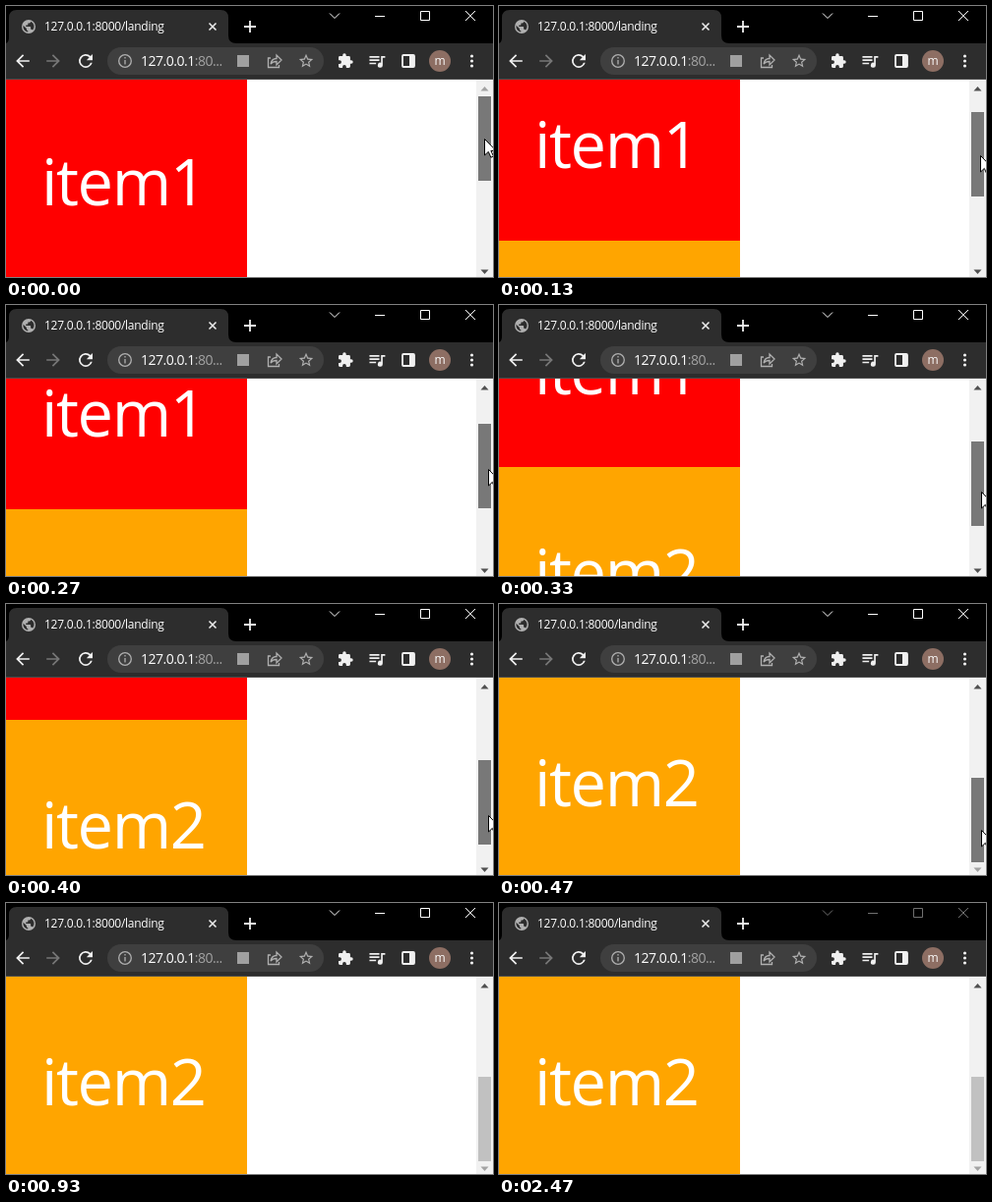
Recreate the animation shown at these times as an HTML page. Size 495 by 276 pixels, loop 4010 ms.

```html
<!DOCTYPE html>
<html lang="en">
<head>
<meta charset="utf-8">
<title>Scrolling page</title>
<style>
  html, body { margin: 0; width: 100%; height: 100%; overflow: hidden; background: #000; }
  svg { display: block; width: 495px; height: 276px; }
  text { font-family: "Open Sans", "Noto Sans", sans-serif; fill: #fff; }
  .line { fill: none; stroke: #f0f0f0; stroke-width: 1.8; }
  .soft { fill: none; stroke: #b0b0b0; stroke-width: 1.3; }
  .item { font-size: 65px; letter-spacing: -1.4px; }
</style>
</head>
<body>
<svg viewBox="0 0 495 276">
  <rect width="495" height="276" fill="#fff"/>

  <g id="page">
    <rect y="75" width="245" height="202" fill="#f00"/>
    <rect y="277" width="245" height="202" fill="#ffa500"/>
    <text class="item" x="36" y="203">item1</text>
    <text class="item" x="36" y="408">item2</text>
  </g>

  <g id="scrollbar">
    <rect x="478" y="75" width="17" height="201" fill="#f1f1f1"/>
    <path id="up" d="M482.500 86.500h8l-4-4.500z"/>
    <path id="down" d="M482.500 268.500h8l-4 4.500z"/>
    <rect id="thumb" x="480" width="13" height="86"/>
  </g>

  <g id="tabs">
    <rect width="495" height="38" fill="#000"/>
    <path d="M0 38q3-1 3-6V12q0-8 8-8H218q8 0 8 8v18q0 8 8 8z" fill="#2d2d2d"/>
    <text x="39" y="25" font-size="12" letter-spacing="-.25">127.0.0.1:8000/landing</text>
    <path class="line" style="stroke-width:1.5" d="M206.500 17.500l7 7m0-7l-7 7"/>
    <path class="line" d="M242 21h12m-6-6v12"/>
    <path id="controls" fill="none" stroke-linejoin="round"
      d="M329 7.500l5 5 5-5M375 10.500h10M421.500 5.500h9v9h-9zM467 5l10 10m0-10l-10 10"/>
  </g>

  <g id="toolbar">
    <rect y="38" width="495" height="37" fill="#2d2d2d"/>
    <rect y="74" width="495" height="1" fill="#4b4b4b"/>
    <rect x="103" y="42" width="220" height="28" rx="14" fill="#3f3f3f"/>
    <circle class="soft" cx="121" cy="56" r="6.300"/>
    <path class="soft" d="M121 55v4.500M121 52v1.600"/>
    <text x="137" y="61" font-size="14" letter-spacing="-.5">127.0.0.1<tspan fill="#a4a4a4">:80...</tspan></text>
    <rect x="235" y="50" width="12" height="12" fill="#a0a0a0"/>
    <path class="soft" d="M269 53h-2.500v9.500h11V60M269 59q1-5.500 6-5.500V50l5 5-5 5v-3.500q-4 0-6 2.500z"/>
    <rect class="line" x="403" y="50" width="12" height="12" rx="1"/>
    <rect x="410" y="50" width="5" height="12" fill="#f0f0f0"/>
    <circle cx="441" cy="56" r="11" fill="#8d6e63"/>
    <text x="441" y="60" font-size="12" text-anchor="middle">m</text>
    <g fill="#f0f0f0">
      <circle cx="473.500" cy="51" r="1.600"/>
      <circle cx="473.500" cy="56" r="1.600"/>
      <circle cx="473.500" cy="61" r="1.600"/>
    </g>
  </g>

  <g id="icons"></g>

  <path id="cursor" d="M0 0v16.500l3.800-3.600 2.600 5.800 2.600-1.200-2.600-5.500h5.300z" fill="#fff" stroke="#000"/>
</svg>
<script>
  const LOOP = 4010, RELEASE = 930, BLUR = 2470;
  const MAX_SCROLL = 202, THUMB_TOP = 92, THUMB_TRAVEL = 85;

  // time, scroll offset, cursor x, cursor y
  const drag = [
    [0, 0, 487, 135], [70, 17, 489, 142], [130, 38, 490, 152], [200, 55, 490, 160],
    [270, 69, 491, 167], [330, 112, 491, 190], [400, 159, 491, 215], [470, 202, 491, 230],
    [530, 202, 491, 236], [600, 202, 491, 242], [670, 202, 491, 247], [730, 202, 491, 251],
    [800, 202, 492, 255], [870, 202, 493, 258]
  ];

  const $ = id => document.getElementById(id);
  const setAll = (node, attrs) => {
    for (const name in attrs) node.setAttribute(name, attrs[name]);
  };
  const set = (id, attrs) => setAll($(id), attrs);

  // Icon outlines live on a 24-unit grid and are centred on (x, y).
  function icon(x, y, scale, fill, d) {
    const path = document.createElementNS('http://www.w3.org/2000/svg', 'path');
    setAll(path, { d, fill, transform: `translate(${x} ${y}) scale(${scale}) translate(-12 -12)` });
    $('icons').append(path);
  }

  const BRIGHT = '#f0f0f0', SOFT = '#b0b0b0', DIM = '#777';
  const arrow = 'M20 11H7.8l5.600-5.600L12 4l-8 8 8 8 1.400-1.400L7.800 13H20z';
  icon(17, 56, 0.85, BRIGHT, arrow);
  icon(48, 56, 0.85, DIM, 'M4 11h12.200l-5.600-5.600L12 4l8 8-8 8-1.400-1.400 5.600-5.600H4z');
  icon(81, 56, 0.87, BRIGHT, 'M17.650 6.350A8 8 0 1 0 19.730 14h-2.080A6 6 0 1 1 16.220 7.780L13 11h7V4z');
  icon(23, 21, 0.7, SOFT, 'M12 2a10 10 0 1 0 0 20 10 10 0 0 0 0-20zm-1 17.930A8 8 0 0 1 4.210 10.210L9 15v1a2 2 0 0 0 2 2zm6.900-2.540A2 2 0 0 0 16 16h-1v-3a1 1 0 0 0-1-1H8v-2h2a1 1 0 0 0 1-1V7h2a2 2 0 0 0 2-2v-.410a8 8 0 0 1 2.900 12.800z');
  icon(305, 56, 0.72, SOFT, 'M22 9.240l-7.190-.620L12 2 9.190 8.630 2 9.240l5.460 4.730L5.820 21 12 17.270 18.180 21l-1.630-7.030zM12 15.400l-3.760 2.270 1-4.280-3.320-2.880 4.380-.380L12 6.100l1.710 4.040 4.380.380-3.320 2.880 1 4.280z');
  icon(345, 56, 0.7, BRIGHT, 'M20.500 11H19V7a2 2 0 0 0-2-2h-4V3.500a2.500 2.500 0 0 0-5 0V5H4a2 2 0 0 0-2 2v3.800h1.500a2.700 2.700 0 0 1 0 5.400H2V20a2 2 0 0 0 2 2h3.800v-1.500a2.700 2.700 0 0 1 5.400 0V22H17a2 2 0 0 0 2-2v-4h1.500a2.500 2.500 0 0 0 0-5z');
  icon(377, 56, 0.84, BRIGHT, 'M15 6H3v2h12zm0 4H3v2h12zM3 16h8v-2H3zM17 6v8.180A3 3 0 1 0 19 17V8h3V6z');

  function render(time) {
    const [, scroll, x, y] = drag.findLast(step => step[0] <= time);
    const held = time < RELEASE;
    const arrowFill = disabled => ({ fill: disabled ? '#a3a3a3' : '#505050' });

    set('page', { transform: `translate(0 ${-scroll})` });
    set('thumb', {
      y: Math.round(THUMB_TOP + scroll / MAX_SCROLL * THUMB_TRAVEL),
      fill: held ? '#787878' : '#c1c1c1'
    });
    set('up', arrowFill(scroll === 0));
    set('down', arrowFill(scroll === MAX_SCROLL));
    set('cursor', {
      transform: `translate(${x - 0.5} ${y + 0.5})`,
      visibility: held ? 'visible' : 'hidden'
    });
    set('controls', { stroke: time < BLUR ? '#fff' : '#707070' });
  }

  const start = performance.now();
  function tick() {
    render((performance.now() - start) % LOOP);
    requestAnimationFrame(tick);
  }
  tick();
</script>
</body>
</html>
```
